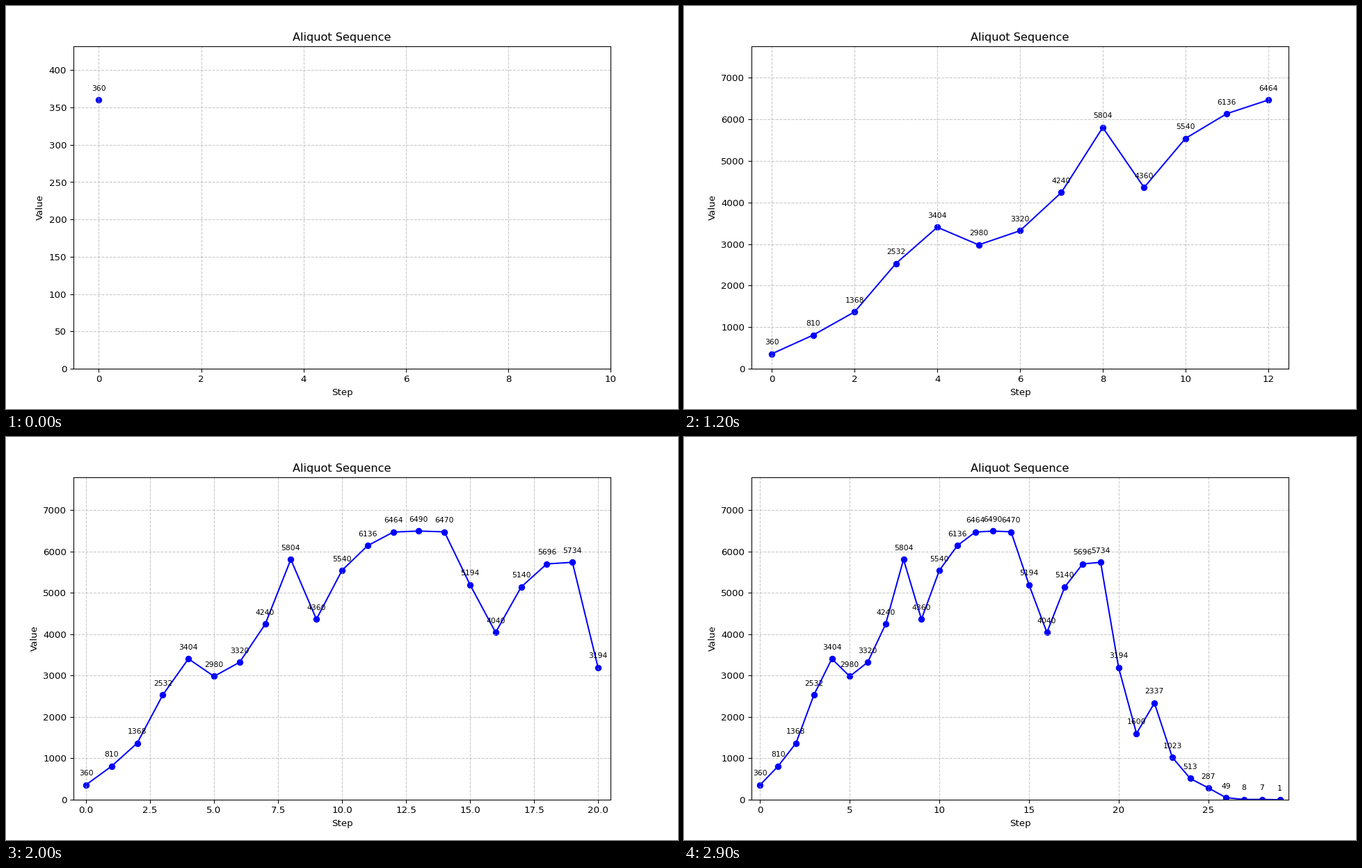
A matplotlib script for the animation above (3 s loop, 966 by 580 pixels).

```python
import matplotlib.pyplot as plt
from matplotlib.animation import FuncAnimation

WIDTH, HEIGHT, DPI = 966, 580, 96.6
SLACK = 0.03  # keeps rounding from dropping a pixel row or column
START, STEPS, INTERVAL = 360, 30, 100


def divisor_sum(n):
    """Sum of the proper divisors of n."""
    return sum(d for d in range(1, n // 2 + 1) if n % d == 0)


def aliquot(n, count):
    seq = [n]
    while len(seq) < count:
        seq.append(divisor_sum(seq[-1]))
    return seq


values = aliquot(START, STEPS)

plt.rcParams["font.family"] = "DejaVu Sans"
fig = plt.figure(figsize=((WIDTH + SLACK) / DPI, (HEIGHT + SLACK) / DPI),
                 dpi=DPI)
ax = fig.add_axes([0.1, 0.0999, 0.8, 0.8001])


def draw(step):
    ax.clear()
    xs = list(range(step + 1))
    ys = values[:step + 1]

    # Scatter points sit below the grid, the line above it.
    ax.scatter(xs, ys, color="blue")
    ax.plot(xs, ys, color="blue")
    for x, y in zip(xs, ys):
        ax.annotate(str(y), (x, y), xytext=(0, 10),
                    textcoords="offset points", ha="center", fontsize=8)

    ax.set_xlim(-0.5, max(10, step + 0.5))
    ax.set_ylim(0, max(ys) * 1.2)
    ax.set_title("Aliquot Sequence")
    ax.set_xlabel("Step")
    ax.set_ylabel("Value")
    ax.grid(True, linestyle="--", alpha=0.7)
    return ax.get_children()


anim = FuncAnimation(fig, draw, frames=STEPS, interval=INTERVAL,
                     init_func=lambda: draw(0), repeat=True,
                     repeat_delay=0, blit=False)
plt.show()
```
